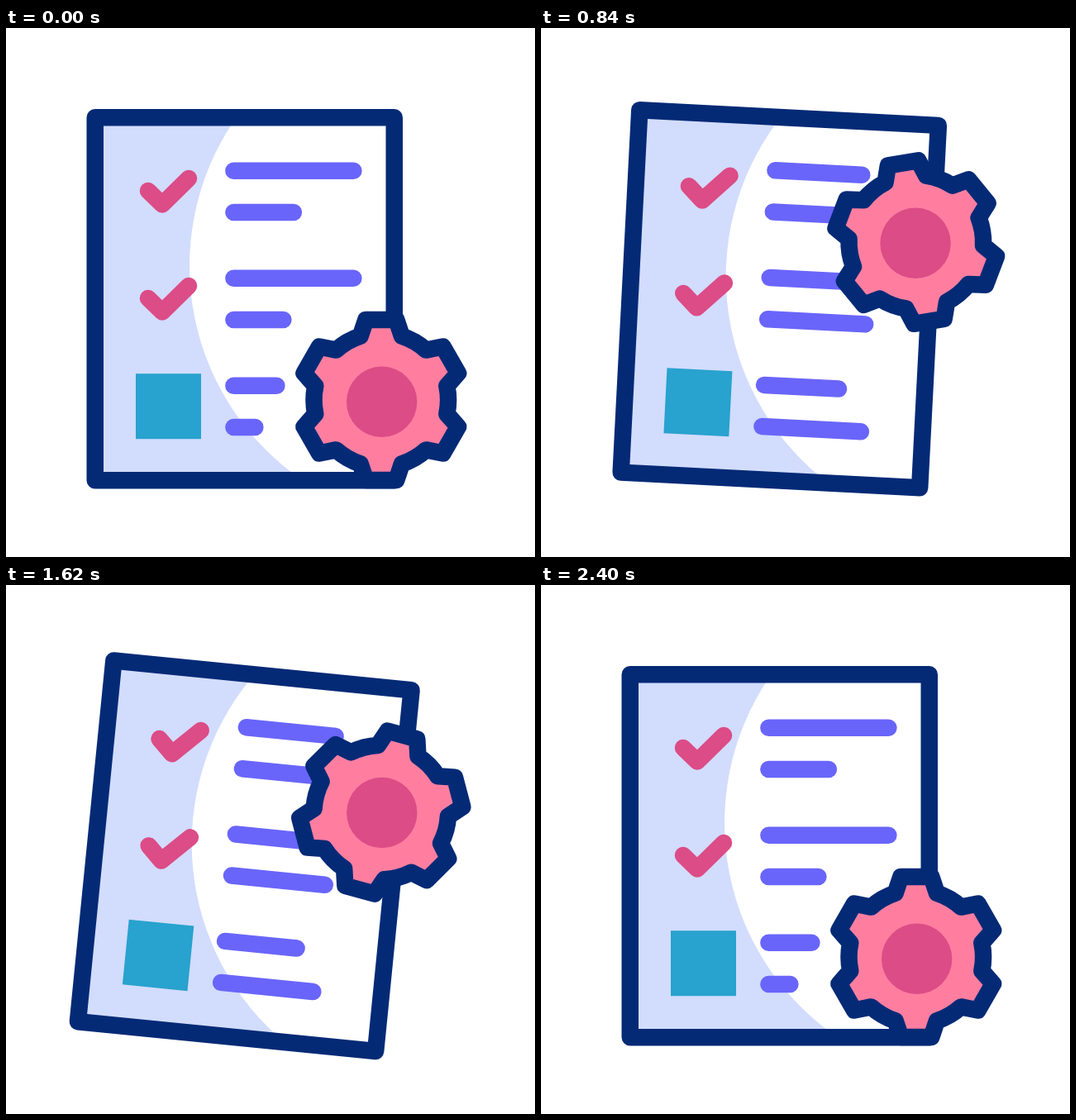
Recreate the animation shown at these times as an HTML page with a canvas. Size 640 by 640 pixels, loop 2.42 s.

```html
<!DOCTYPE html>
<html lang="en">
<head>
<meta charset="utf-8">
<title>Checklist and gear</title>
<style>
  html, body { margin: 0; width: 100%; height: 100%; overflow: hidden; background: #fff; }
  canvas { display: block; width: 640px; height: 640px; }
</style>
</head>
<body>
<canvas id="stage" width="640" height="640"></canvas>
<script>
const ctx = document.getElementById('stage').getContext('2d');

const STEP = 20, STEPS = 121, SPAN = 120;
const STROKE = 20.5, TAU = Math.PI * 2, DEG = Math.PI / 180;
const NAVY = '#042a76', PALE = '#d2dcfd', VIOLET = '#6965fa',
      ROSE = '#dc4c86', PINK = '#ff7ea0', TEAL = '#28a2ce';

const page = { x: 107.75, y: 108.25, w: 362, h: 439 };
const pivot = { x: 288.75, y: 327.75 };
const gear = { x: 453.8, y: 450, lift: 243.5 };

// Each row: baseline y, resting length, length change at mid loop.
const rows = [
  [172.75, 145, -51], [223, 72.5, 30],
  [302.75, 145, -55.5], [353, 60, 74.3],
  [432.75, 52, 48.7], [483, 26, 119.5]
];

const ease = u => u * u * (3 - 2 * u);
const mix = (a, b, u) => a + (b - a) * u;

function strokePath(points, color) {
  ctx.beginPath();
  points.forEach(([x, y]) => ctx.lineTo(x, y));
  ctx.strokeStyle = color;
  ctx.stroke();
}

function disc(x, y, r, color) {
  ctx.beginPath();
  ctx.arc(x, y, r, 0, TAU);
  ctx.fillStyle = color;
  ctx.fill();
}

// Swings 0 → 10 → -10 over the first half, mirrored in the second.
function tilt(half) {
  return half < 30 ? mix(0, 10, ease(half / 30)) : mix(10, -10, ease(half / 30 - 1));
}

function drawPage(angle, stretch) {
  ctx.save();
  ctx.translate(pivot.x, pivot.y);
  ctx.rotate(angle * DEG);
  ctx.translate(-pivot.x, -pivot.y);

  ctx.save();
  ctx.beginPath();
  ctx.rect(page.x, page.y, page.w, page.h);
  ctx.clip();
  ctx.fillStyle = PALE;
  ctx.fillRect(page.x, page.y, page.w, page.h);
  disc(536, 288, 314, '#fff');
  ctx.restore();

  ctx.strokeStyle = NAVY;
  ctx.strokeRect(page.x, page.y, page.w, page.h);

  for (const y of [0, 130])
    strokePath([[172, 197 + y], [189, 213.5 + y], [221, 182 + y]], ROSE);

  ctx.fillStyle = TEAL;
  ctx.fillRect(157, 418.2, 79, 79);

  for (const [y, length, change] of rows)
    strokePath([[275.4, y], [275.4 + length + change * stretch, y]], VIOLET);
  ctx.restore();
}

function drawGear(y, angle, orbit) {
  ctx.save();
  ctx.translate(gear.x, y);
  ctx.save();
  ctx.rotate(angle * DEG);
  ctx.beginPath();
  for (let tooth = 0; tooth < 6; tooth++) {
    const mid = tooth * 60 - 90;
    for (const side of [-10.8, 10.8]) {
      const a = (mid + side) * DEG;
      ctx.lineTo(98.75 * Math.cos(a), 98.75 * Math.sin(a));
    }
    ctx.arc(0, 0, 81.3, (mid + 18) * DEG, (mid + 42) * DEG);
  }
  ctx.closePath();
  ctx.fillStyle = PINK;
  ctx.fill();
  ctx.strokeStyle = NAVY;
  ctx.stroke();
  ctx.restore();

  // The hub drifts on a tiny circle.
  disc(0.35 + 1.1 * Math.cos(orbit * DEG), 1.35 + 1.1 * Math.sin(orbit * DEG), 42.7, ROSE);
  ctx.restore();
}

function draw(step) {
  const half = Math.min(step, SPAN - step);
  const sway = ease(half / 60);
  ctx.fillStyle = '#fff';
  ctx.fillRect(0, 0, 640, 640);
  ctx.lineWidth = STROKE;
  ctx.lineCap = ctx.lineJoin = 'round';
  drawPage(tilt(half), sway);
  drawGear(gear.y - gear.lift * sway, 180 * ease(step / SPAN), 62 + 3 * step);
}

const start = performance.now();
function tick() {
  const elapsed = performance.now() - start;
  draw(Math.floor((elapsed + 0.5) / STEP) % STEPS);
  requestAnimationFrame(tick);
}
tick();
</script>
</body>
</html>
```
